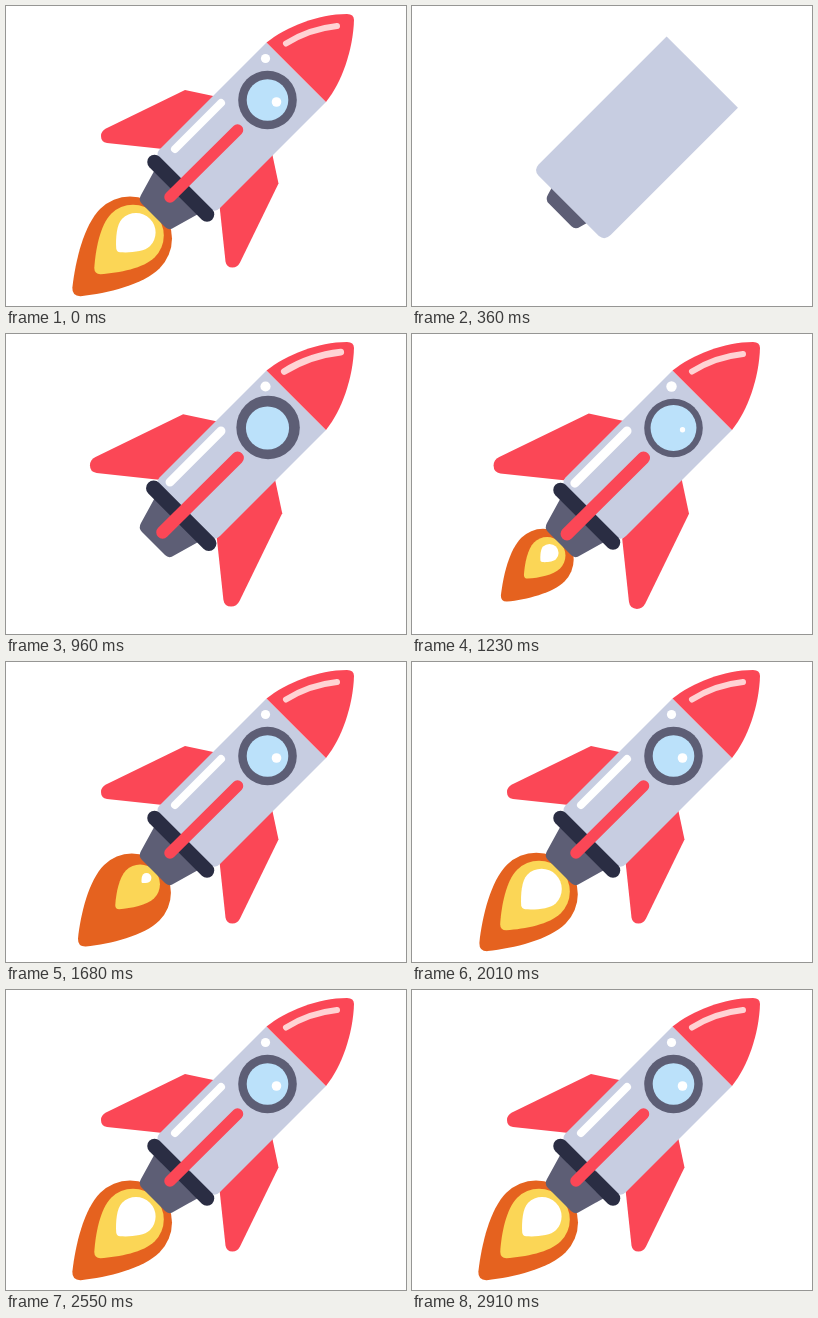
These frames come from a looping animation (400x300 px, 2940 ms). An HTML page:

```html
<!DOCTYPE html>
<html lang="en">
<head>
<meta charset="utf-8">
<title>Rocket</title>
<style>
  html, body { margin: 0; width: 100%; height: 100%; overflow: hidden; background: #fff; }
  svg { display: block; width: 100%; height: 100%; }
</style>
</head>
<body>
<svg id="stage" viewBox="0 0 400 300" fill="none" stroke-linecap="round"></svg>
<script>
const LOOP = 2940, FRAME = 30, AXIS = 356.5;
const RED = '#fb4756', STEEL = '#5d5e75', INK = '#2a2d43', WHITE = '#fff';
const stage = document.getElementById('stage');
const parts = [];

function shape(tag, attrs) {
  const node = document.createElementNS('http://www.w3.org/2000/svg', tag);
  for (const name in attrs) node.setAttribute(name, attrs[name]);
  return node;
}
const fill = (d, color) => shape('path', { d, fill: color });
const line = (d, color, width) => shape('path', { d, stroke: color, 'stroke-width': width });
const disc = (cx, cy, r, color) => shape('circle', { cx, cy, r, fill: color });

// Each part scales about its anchor; scaleAt maps the time to a scale.
function add(node, anchor, scaleAt) {
  const group = shape('g', {});
  group.append(node);
  stage.append(group);
  parts.push({ group, anchor, scaleAt });
}

const ease = p => (1 - Math.cos(Math.PI * Math.min(1, Math.max(0, p)))) / 2;

// Grow past full size, then settle back.
function pop(start, overshoot, span = 300) {
  return t => (1 + overshoot) * ease((t - start) / span)
    - overshoot * ease((t - start - span) / span);
}

// A first burst that dies down, then a damped spring; inner layers lag.
function flicker(layer) {
  const ignite = 1115 + 20 * layer, rekindle = 1560 + 46 * layer;
  return t => {
    if (t < ignite) return 0;
    if (t < rekindle) return Math.sin(Math.PI * (t - ignite) / (rekindle - ignite));
    const age = t - rekindle;
    return 1 - Math.exp(-0.008 * age) * Math.cos(0.0115 * age);
  };
}

// Teardrop of radius r whose tip points down and left.
function teardrop(x, y, r, length, color) {
  const side = sign => [[.3, 1], [.7, .54], [.97, .14]].map(([u, v]) => [u * length, sign * v * r]);
  const [c1, c2, tip] = side(-1), [d1, d2, end] = side(1);
  const node = fill(`M0,${-r}C${c1} ${c2} ${tip}Q${1.05 * length},0 ${end}C${d2} ${d1} 0,${r}A${r},${r} 0 0 1 0,${-r}Z`, color);
  node.setAttribute('transform', `translate(${x} ${y}) rotate(135)`);
  return node;
}

['#e5621f', '#fbd656', WHITE].forEach((color, i) => {
  const flame = teardrop(124 + 3 * i, 232.5 - 3 * i, 42 - 11.2 * i, 78 - 26 * i, color);
  add(flame, [150 - 3 * i, 206.5 + 3 * i], flicker(i));
});

const finPop = pop(750, .39);
for (const mirrored of [false, true]) {
  const fin = fill('M179,84L212,91 157,143 101,137Q95,136 95,130 95,125 100,122.5Z', RED);
  if (mirrored) fin.setAttribute('transform', `matrix(0 -1 -1 0 ${AXIS} ${AXIS})`);
  add(fin, mirrored ? [AXIS - 118, AXIS - 196] : [196, 118], finPop);
}

// Hull
add(fill('M152,158L135,189Q132,194 136,198L159,221Q163,225 168,221.5L198.5,204.5Z', STEEL),
  [179, 178], pop(120, .08));
add(fill('M260.5,36.5L320,96 214,202Q209,207 204,203L153.5,152.5Q149.5,148 153.5,143.5Z', '#c7cde1'),
  [290, 67], pop(100, .25));
add(fill('M260.5,36.5C280,21 312,8 341,8Q348,8 348,14C347,44 336,76 320,96Z', RED),
  [290, 67], pop(360, .04));

// Trim
add(line('M148.5,156L201,208.5', INK, 14.5), [165, 192], pop(480, .15));
add(line('M280,37.5Q303,23 331,20', '#ffd3d4', 6), [296, 37], pop(600, .12));
add(disc(259.5, 52.5, 4.6, WHITE), [259.5, 52.5], finPop);
add(line('M169,143L215,97', WHITE, 8), [215, 97], finPop);
add(line('M164,191L231.5,124', RED, 11.5), [231.5, 124], finPop);

// Porthole
add(disc(261.5, 94, 29.3, STEEL), [254.5, 101], pop(580, .1));
add(disc(261.5, 94, 20.8, '#bbe1fa'), [261.5, 94], pop(750, .3));
add(disc(270.5, 96, 4.8, WHITE), [270.5, 95.5], pop(1100, .39));

function draw(time) {
  // The finished rocket opens the loop, then the build starts from nothing.
  const t = time % LOOP < FRAME ? LOOP : time % LOOP;
  for (const { group, anchor: [x, y], scaleAt } of parts) {
    const s = scaleAt(t);
    group.setAttribute('visibility', s > 0.001 ? 'visible' : 'hidden');
    group.setAttribute('transform', `translate(${x} ${y}) scale(${s}) translate(${-x} ${-y})`);
  }
}

const begin = performance.now();
function tick() {
  draw(performance.now() - begin);
  requestAnimationFrame(tick);
}
tick();
</script>
</body>
</html>
```
